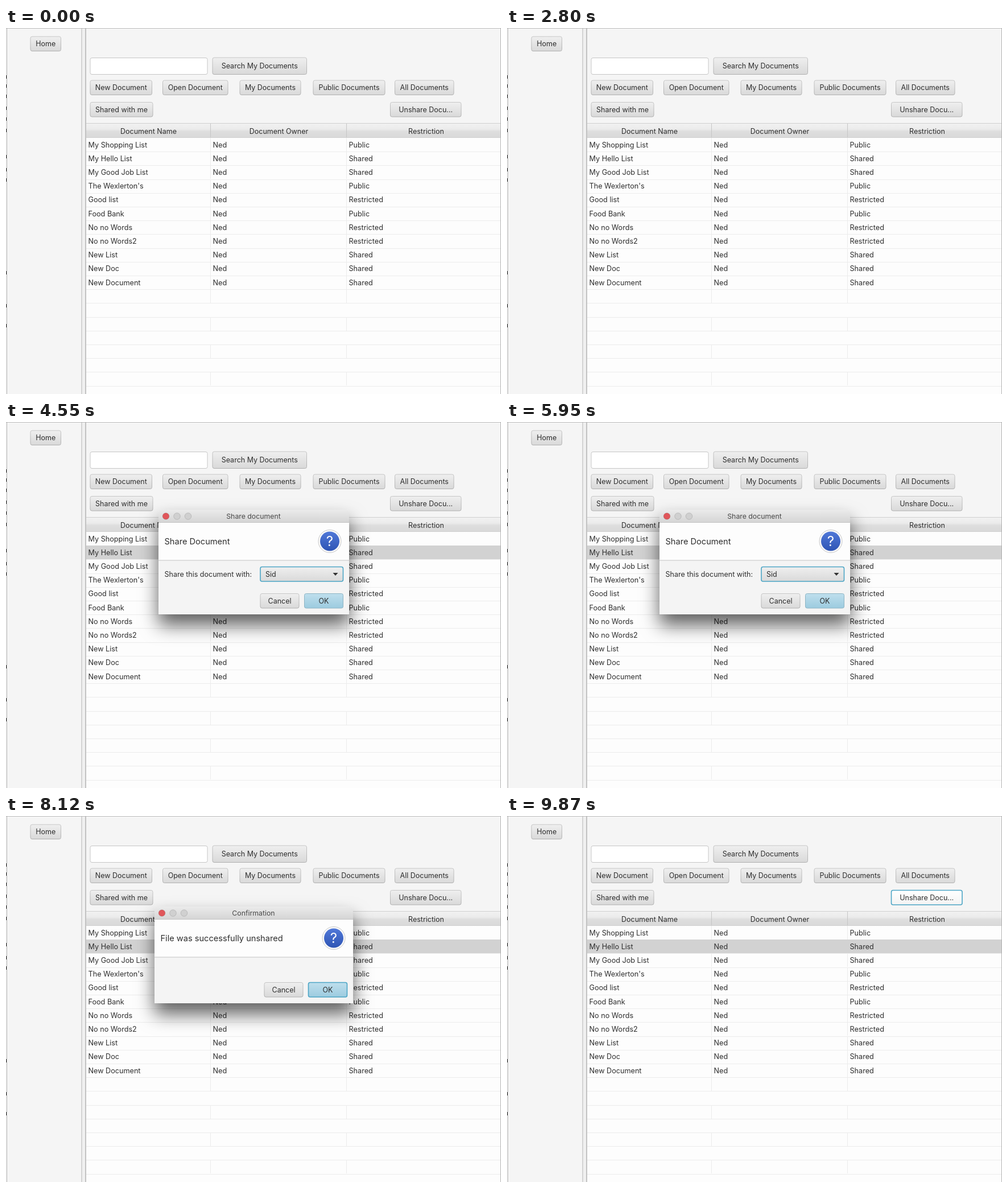
An HTML page that plays this animation: 870x643 px, repeating every 9.94 s.

```html
<!DOCTYPE html>
<html lang="en">
<head>
<meta charset="utf-8">
<title>Document list</title>
<style>
  html, body { margin: 0; width: 100%; height: 100%; overflow: hidden; background: #f5f5f5; }
  svg { display: block; width: 870px; height: 643px; font: 12.5px Inter, sans-serif; }
  text { fill: #2e2e2e; white-space: pre; }
  .mid { text-anchor: middle; }
  .button { fill: url(#face); stroke: url(#edge); }
  .ok { fill: url(#okFace); stroke: #8db4c4; }
  .focus { stroke: #4ca5c5; stroke-width: 1.6; }
  .hover { fill: url(#hoverFace); }
  .grid { stroke: #ececec; fill: none; }
  .cell { font-size: 12.65px; }
  .title { font-size: 12.3px; fill: #4a4a4a; }
  .heading { font-size: 14.6px; }
  .window { filter: drop-shadow(0 19px 16px rgba(0, 0, 0, .62)); }
  .picked text { fill: #fff; }
</style>
</head>
<body>
<svg id="stage" viewBox="0 0 870 643">
  <defs>
    <linearGradient id="face" x2="0" y2="1"><stop stop-color="#efefef"/><stop offset="1" stop-color="#d9d9d9"/></linearGradient>
    <linearGradient id="edge" x2="0" y2="1"><stop stop-color="#c6c6c6"/><stop offset="1" stop-color="#b0b0b0"/></linearGradient>
    <linearGradient id="hoverFace" x2="0" y2="1"><stop stop-color="#fff"/><stop offset="1" stop-color="#f3f3f3"/></linearGradient>
    <linearGradient id="okFace" x2="0" y2="1"><stop stop-color="#bfdfed"/><stop offset="1" stop-color="#9ccbdf"/></linearGradient>
    <linearGradient id="head" x2="0" y2="1"><stop stop-color="#f2f2f2"/><stop offset=".42" stop-color="#ebebeb"/><stop offset=".55" stop-color="#dedede"/><stop offset="1" stop-color="#d9d9d9"/></linearGradient>
    <linearGradient id="bar" x2="0" y2="1"><stop stop-color="#ebebeb"/><stop offset="1" stop-color="#d5d5d5"/></linearGradient>
    <linearGradient id="blue" x2="0" y2="1"><stop stop-color="#5078d8"/><stop offset="1" stop-color="#2f55b4"/></linearGradient>
  </defs>
</svg>
<script>
const stage = document.getElementById('stage');

const rect = (x, y, w, h, attrs) => `<rect x="${x}" y="${y}" width="${w}" height="${h}" ${attrs}/>`;
const line = (d, stroke, width = 1) => `<path d="${d}" stroke="${stroke}" stroke-width="${width}" fill="none"/>`;
const text = (x, y, label, cls = '') => `<text x="${x}" y="${y + 4.5}" class="${cls}">${label}</text>`;
const button = (x, y, w, h, label, cls = '', id = '') =>
  rect(x, y, w, h - .5, `rx="3" class="button ${cls}" id="${id}"`) +
  text(x + w / 2, y + h / 2 - .5, label, 'mid');

const ROW = 24.2, TOP = 193;
const owner = 'Ned';
const rows = [
  ['My Shopping List', 'Public'], ['My Hello List', 'Shared'], ['My Good Job List', 'Shared'],
  ["The Wexlerton's", 'Public'], ['Good list', 'Restricted'], ['Food Bank', 'Public'],
  ['No no Words', 'Restricted'], ['No no Words2', 'Restricted'], ['New List', 'Shared'],
  ['New Doc', 'Shared'], ['New Document', 'Shared']
];

function table() {
  let grid = '';
  for (let i = 0; i < 19; i++) {
    const y = Math.round(TOP + i * ROW);
    if (i) grid += `M141 ${y + .5}H869`;
    if (i < rows.length || i % 2) grid += `M359.5 ${y}v24M598.5 ${y}v24`;
  }
  const cells = rows.map(([name, access], i) => {
    const cell = (x, label) => text(x, 205 + i * ROW, label, 'cell');
    return `<g id="row${i}">${cell(144.5, name)}${cell(363.5, owner)}${cell(602.5, access)}</g>`;
  });
  return rect(141, TOP, 728, 450, 'id="sheet" fill="#fdfdfd"') +
    `<path class="grid" id="grid" d="${grid}"/>` +
    rect(141, 217, 728, 24, 'id="selection"') +
    rect(141, 167, 728, 26, 'fill="url(#head)"') +
    line('M141 167.5H869M141 192.5H869', '#cfcfcf') +
    line('M359.5 168V192M598.5 168V192', '#c6c6c6') +
    text(250.5, 181, 'Document Name', 'mid') + text(479.5, 181, 'Document Owner', 'mid') +
    text(738.5, 181, 'Restriction', 'mid') + cells.join('') +
    rect(140.5, 167.5, 729, 480, 'id="tableFocus" fill="none" stroke="#55a9c4" stroke-width="1.5"');
}

function dialog(id, x, y, w, h, title, heading, content, okId) {
  const right = x + w, low = y + h - 36.5, cx = right - 34, cy = y + 55.5;
  const lights = ['#e0565a', '#d0d0d0', '#d0d0d0'].map((color, i) =>
    `<circle cx="${x + 13 + i * 19.5}" cy="${y + 11.5}" r="5.8" fill="${color}" stroke="#0002"/>`);
  return `<g id="${id}">` +
    `<path class="window" fill="#f4f4f4" d="M${x} ${y + h}V${y + 5}q0-5 5-5H${right - 5}q5 0 5 5V${y + h}z"/>` +
    `<path fill="url(#bar)" d="M${x} ${y + 22}V${y + 5}q0-5 5-5H${right - 5}q5 0 5 5v17z"/>` +
    lights.join('') + text(x + w / 2 - .5, y + 11.5, title, 'mid title') +
    rect(x, y + 22, w, 67, 'fill="#fdfdfd"') +
    line(`M${x} ${y + 22.5}H${right}M${x} ${y + 89}H${right}`, '#c4c4c4') +
    text(x + 10.5, y + 56.5, heading, 'heading') +
    `<circle cx="${cx}" cy="${cy}" r="20" fill="#fafafa" stroke="#c8c8c8"/>` +
    `<circle cx="${cx}" cy="${cy}" r="17" fill="url(#blue)"/>` +
    `<text x="${cx}" y="${cy + 8.5}" class="mid" style="font-size:24px;fill:#fff">?</text>` +
    content + button(right - 156, low, 68, 26, 'Cancel') +
    button(right - 78.5, low, 68, 26, 'OK', 'ok', okId) + '</g>';
}

const combo = text(278.5, 267, 'Share this document with:') +
  rect(447, 254.5, 145.5, 25.5, 'rx="3" class="button" id="combo"') +
  text(456, 267, 'Sid') + '<path d="M574.5 265h9l-4.5 5z" fill="#333"/>';

stage.insertAdjacentHTML('beforeend',
  rect(0, 0, 870, 643, 'id="backdrop"') +
  rect(133, 1, 7, 642, 'fill="#f0f0f0"') +
  line('M133 1V643', '#d4d4d4', 2) + line('M140 1V643', '#c2c2c2', 2) +
  button(43, 15, 53.5, 26, 'Home') +
  rect(148, 52.5, 206, 29, 'rx="3" fill="#fff" stroke="#c6c6c6"') +
  button(363, 52, 165.5, 30, 'Search My Documents') +
  button(148, 92, 108.5, 26, 'New Document') +
  button(275.5, 92, 114.5, 26, 'Open Document') +
  button(411, 92, 107, 26, 'My Documents') +
  button(540, 92, 126, 26, 'Public Documents') +
  button(683.5, 92, 103.5, 26, 'All Documents') +
  button(148, 130.5, 110, 26, 'Shared with me') +
  button(675.5, 130.5, 124.5, 26, 'Unshare Docu...', '', 'unshare') +
  table() +
  line('M0 .5H870', '#bdbdbd') + line('M1.5 0V643M869.5 0V643', '#b4b4b4') +
  line([86, 102, 120, 141, 160, 180, 226, 249, 267, 430, 488, 523].map(y => `M.5 ${y - 3}v6`).join(''), '#333') +
  dialog('share', 268, 154, 335, 184, 'Share document', 'Share Document', combo, 'accept') +
  dialog('done', 261, 159, 349, 170, 'Confirmation', 'File was successfully unshared', '', 'close'));

const el = id => document.getElementById(id);
const show = (id, on) => el(id).style.display = on ? '' : 'none';
const LOOP = 9940;
const SELECT = 3080, HOVER = 4200, SHARE = 4480, ACCEPT = 6650, DONE = 7420, CLOSE = 9310;

el('close').classList.add('focus');

function draw(now) {
  const t = now % LOOP;
  const within = (from, to) => t >= from && t < to;
  const active = within(SELECT, SHARE), closed = t >= CLOSE;
  const accepting = t >= ACCEPT;

  el('backdrop').setAttribute('fill', active ? '#fcfdfd' : '#f5f5f5');
  el('sheet').setAttribute('fill', active ? '#fcfefd' : '#fdfdfd');
  show('grid', !active);
  show('tableFocus', active);
  show('selection', t >= SELECT);
  el('selection').setAttribute('fill', active ? '#309fc9' : '#d2d2d2');
  el('row1').classList.toggle('picked', active);

  const unshare = el('unshare').classList;
  unshare.toggle('hover', within(HOVER, SHARE) || closed);
  unshare.toggle('focus', closed);

  show('share', within(SHARE, DONE));
  show('done', within(DONE, CLOSE));
  el('combo').classList.toggle('focus', !accepting);
  el('accept').classList.toggle('focus', accepting);
  requestAnimationFrame(draw);
}
requestAnimationFrame(draw);
</script>
</body>
</html>
```
